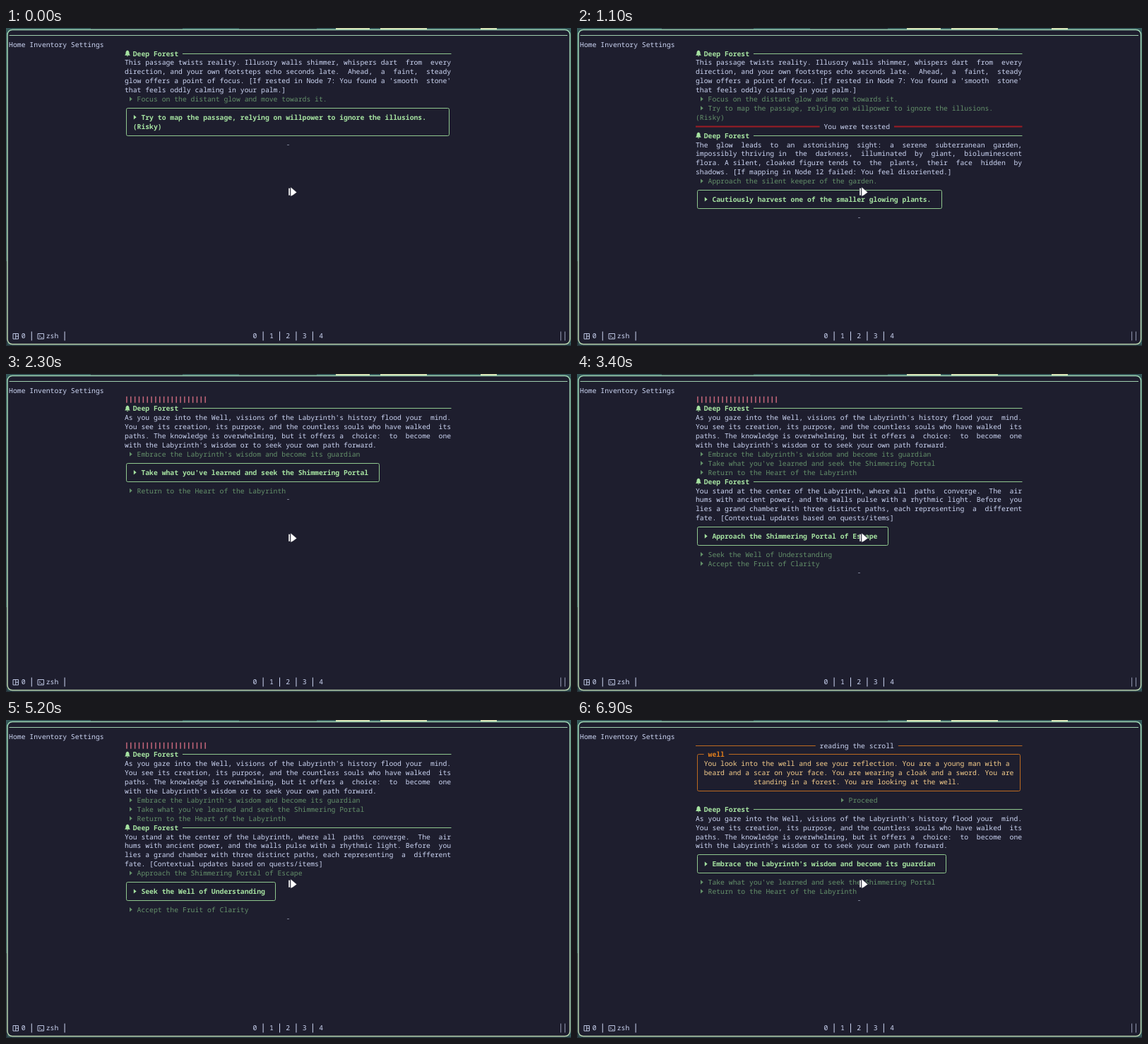
An HTML page that plays this animation: 800x450 px, repeating every 7 s.

```html
<!DOCTYPE html>
<html lang="en">
<head>
<meta charset="utf-8">
<title>Text adventure</title>
<style>
html, body { margin: 0; width: 100%; height: 100%; overflow: hidden; background: #1e1e2e; }
svg { display: block; width: 800px; height: 450px; }
text {
  font: 9.757px "Noto Sans Mono", "DejaVu Sans Mono", monospace;
  white-space: pre; text-rendering: geometricPrecision; fill: #cdd6f4;
}
.bold { font-weight: 600; }
.green { fill: #a6e3a1; }
.dim { fill: #64906a; }
.orange { fill: #df7d1c; }
.cream { fill: #f8cf8c; }
.line { fill: none; stroke-width: 1; }
.scene { opacity: 0; }
</style>
</head>
<body>
<svg id="stage" viewBox="0 0 800 450">
  <linearGradient id="edge" x2="0" y2="1">
    <stop stop-color="#9fd6b4"/><stop offset="1" stop-color="#b9d3ae"/>
  </linearGradient>
  <rect width="800" height="450" fill="#35595a"/>
  <path d="M0 330H2V450H0zM120 0H250V2H120zM330 0H440V2H330zM0 448.500H800V450H0z" fill="#27343b"/>
  <path d="M467 0H515V2H467zM530 0H596V2H530zM672 0H695V2H672z" fill="#d9dfb4"/>
  <rect x="2" y="2.500" width="796.500" height="445" rx="7" fill="#1e1e2e" stroke="url(#edge)" stroke-width="1.500"/>
  <path d="M4.500 10.500H795" stroke="#a0cfae"/>
  <g id="bar"></g>
  <g id="scenes"></g>
  <g fill="#fff" stroke="#1e1e2e" stroke-width=".5">
    <path d="M400 226.500h2.300v10.500h-2.300z"/>
    <path d="M403 225L411.800 232.600L406.500 236.500L403 238.300z"/>
  </g>
</svg>
<script>
const CELL = 5.854, ROW = 12.9, LEFT = 168, COLS = 79, LOOP = 7000;
const GREEN = '#90c88f', ORANGE = '#bd6a20', RED = '#9c1c24', TEXT = '#cdd6f4';

const x = col => +(LEFT + col * CELL).toFixed(2);
const y = row => +(36 + row * ROW).toFixed(2);
const crisp = v => Math.floor(v) + .5;
const type = (col, row, s, cls = '') =>
  `<text x="${x(col)}" y="${y(row) + 3.5}" class="${cls}">${s}</text>`;
const rule = (from, to, row, color, width = 1) =>
  `<path class="line" d="M${x(from)} ${crisp(y(row))}H${x(to)}" stroke="${color}" style="stroke-width:${width}"/>`;
const frame = (from, to, top, bottom, color) => {
  const [l, r, t, b] = [x(from + .5), x(to + .5), y(top), y(bottom)].map(crisp);
  return `<rect class="line" x="${l}" y="${t}" width="${r - l}" height="${b - t}" rx="2" stroke="${color}"/>`;
};
const arrow = (col, row, cls) =>
  `<path class="${cls}" d="M${x(col + .5) - 1.8} ${y(row) - 3.2}l3.800 3.200l-3.800 3.200z"/>`;
const divider = (col, row, color = TEXT) =>
  `<path class="line" d="M${x(col + .5)} ${y(row) - 6.4}v12.900" stroke="${color}"/>`;

// Each block takes its first row and returns [markup, rows used].
const heading = row => [
  `<path class="green" transform="translate(${x(0)} ${y(row) - 4.5})"
    d="M4 0C2 .8 1.500 2 1.500 4C1.500 5.500 .8 6.200 0 7.200H8C7.200 6.200 6.500 5.500 6.500 4C6.500 2 6 .8 4 0zM2.800 7.800H5.200Q4 9.800 2.800 7.800z"/>` +
  type(2, row, 'Deep Forest', 'bold green') + rule(14, COLS, row, GREEN), 1];

const prose = lines => row => [lines.map((s, i) => type(0, row + i, s)).join(''), lines.length];

const separator = (label, color, width) => row => {
  const col = Math.floor((COLS - label.length) / 2);
  return [rule(0, col - 1, row, color, width) + type(col, row, label) +
    rule(col + label.length + 1, COLS, row, color, width), 1];
};

const health = row => [`<path class="line" stroke="#c4667a" style="stroke-width:9;stroke-dasharray:1.5 ${CELL - 1.5}"
  d="M${x(.5) - .75} ${y(row) + .3}H${x(20)}"/>`, 1];

const choices = (list, picked, centred) => first => {
  let row = first, out = '';
  list.forEach((item, i) => {
    const [head, ...rest] = item.split('\n');
    const on = i === picked, cls = on ? 'bold green' : 'dim';
    const right = rest.length ? COLS - 1 : head.length + 6;
    const shift = centred ? (on ? 32 : 34) : 0;
    const col = shift + (on ? 2 : 1), top = row;
    if (on) row++;
    out += arrow(col, row, cls) + type(col + 2, row++, head, cls);
    rest.forEach(s => out += type(on ? 2 : 0, row++, s, cls));
    if (on) out += frame(shift, shift + right, top, row++, GREEN);
  });
  return [out, row - first];
};

const scroll = row => {
  const lines = [
    'You look into the well and see your reflection. You are a young man with a',
    'beard and a scar on your face. You are wearing a cloak and a sword. You are',
    'standing in a forest. You are looking at the well.'];
  return [frame(0, COLS - 1, row, row + 4, ORANGE) + rule(2, 8, row, '#1e1e2e', 3) +
    type(3, row, 'well', 'bold orange') +
    lines.map((s, i) => type(2 + Math.floor((75 - s.length) / 2), row + 1 + i, s, 'cream')).join(''), 5];
};

const passage = [heading, prose([
  'This passage twists reality. Illusory walls shimmer, whispers dart  from  every',
  'direction, and your own footsteps echo seconds late.  Ahead,  a  faint,  steady',
  "glow offers a point of focus. [If rested in Node 7: You found a 'smooth  stone'",
  'that feels oddly calming in your palm.]'])];
const passageChoices = ['Focus on the distant glow and move towards it.',
  'Try to map the passage, relying on willpower to ignore the illusions.\n(Risky)'];

const garden = [...passage, choices(passageChoices), separator('You were tessted', RED, 2),
  heading, prose([
  'The  glow  leads  to  an  astonishing  sight:  a  serene  subterranean  garden,',
  'impossibly thriving in  the  darkness,  illuminated  by  giant,  bioluminescent',
  'flora. A silent, cloaked figure tends to  the  plants,  their  face  hidden  by',
  'shadows. [If mapping in Node 12 failed: You feel disoriented.]'])];
const gardenChoices = ['Approach the silent keeper of the garden.',
  'Cautiously harvest one of the smaller glowing plants.'];

const well = [heading, prose([
  "As you gaze into the Well, visions of the Labyrinth's history flood your  mind.",
  'You see its creation, its purpose, and the countless souls who have walked  its',
  'paths. The knowledge is overwhelming, but it offers a  choice:  to  become  one',
  "with the Labyrinth's wisdom or to seek your own path forward."])];
const wellChoices = ["Embrace the Labyrinth's wisdom and become its guardian",
  "Take what you've learned and seek the Shimmering Portal",
  'Return to the Heart of the Labyrinth'];

const heart = [health, ...well, choices(wellChoices), heading, prose([
  'You stand at the center of the Labyrinth, where all  paths  converge.  The  air',
  'hums with ancient power, and the walls pulse with a rhythmic light. Before  you',
  'lies a grand chamber with three distinct paths, each representing  a  different',
  'fate. [Contextual updates based on quests/items]'])];
const heartChoices = ['Approach the Shimmering Portal of Escape',
  'Seek the Well of Understanding', 'Accept the Fruit of Clarity'];

const reading = [separator('reading the scroll', ORANGE), scroll];

const timeline = [
  [0, ...passage, choices(passageChoices, 1)],
  [600, ...garden, choices(gardenChoices, 0)],
  [1100, ...garden, choices(gardenChoices, 1)],
  [1500, health, ...well, choices(wellChoices, 0)],
  [2300, health, ...well, choices(wellChoices, 1)],
  [2900, health, ...well, choices(wellChoices, 2)],
  [3400, ...heart, choices(heartChoices, 0)],
  [4100, ...heart, choices(heartChoices, 1)],
  [4200, ...heart, choices(heartChoices, 2)],
  [5100, ...heart, choices(heartChoices, 1)],
  [5700, ...reading, choices(['Proceed'], 0, true)],
  [6900, ...reading, choices(['Proceed'], -1, true), ...well, choices(wellChoices, 0)]
];

let css = '', markup = '';
timeline.forEach(([start, ...blocks], i) => {
  const end = i + 1 < timeline.length ? timeline[i + 1][0] : LOOP;
  const pct = ms => (ms / LOOP * 100).toFixed(4) + '%';
  css += `@keyframes show${i} { ${start ? '0% { opacity: 0 }' : ''} ${pct(start)} { opacity: 1 } ` +
    `${end < LOOP ? pct(end) + ' { opacity: 0 }' : ''} 100% { opacity: ${end < LOOP ? 0 : 1} } }\n` +
    `#s${i} { animation: show${i} ${LOOP}ms step-end infinite }\n`;
  let row = 0, body = '';
  for (const block of blocks) {
    const [out, used] = block(row);
    body += out;
    row += used;
  }
  body += `<path class="line" d="M398 ${crisp(y(row))}h3" stroke="#787d92"/>`;
  markup += `<g class="scene" id="s${i}">${body}</g>`;
});

document.getElementById('bar').innerHTML =
  type(-28, -1, 'Home Inventory Settings') +
  type(-25, 31, '0') + divider(-23, 31) + type(-19, 31, 'zsh') + divider(-15, 31) +
  [0, 1, 2, 3, 4].map(n => type(31 + n * 4, 31, n) + (n < 4 ? divider(33 + n * 4, 31) : '')).join('') +
  divider(105, 31, '#9399b2') + divider(106, 31, '#9399b2') +
  `<path class="line" stroke="${TEXT}" d="M10 432.500h7.500v7.500h-7.500zM13.700 432.500v7.500M13.700 436.200h3.800
    M45 432.500h8.500v7.500h-8.500zM46.800 434.500l1.800 1.700l-1.800 1.700M49.500 438.200h2.500" style="stroke-width:.9"/>`;
document.getElementById('scenes').innerHTML = markup;
document.head.appendChild(document.createElement('style')).textContent = css;
</script>
</body>
</html>
```
